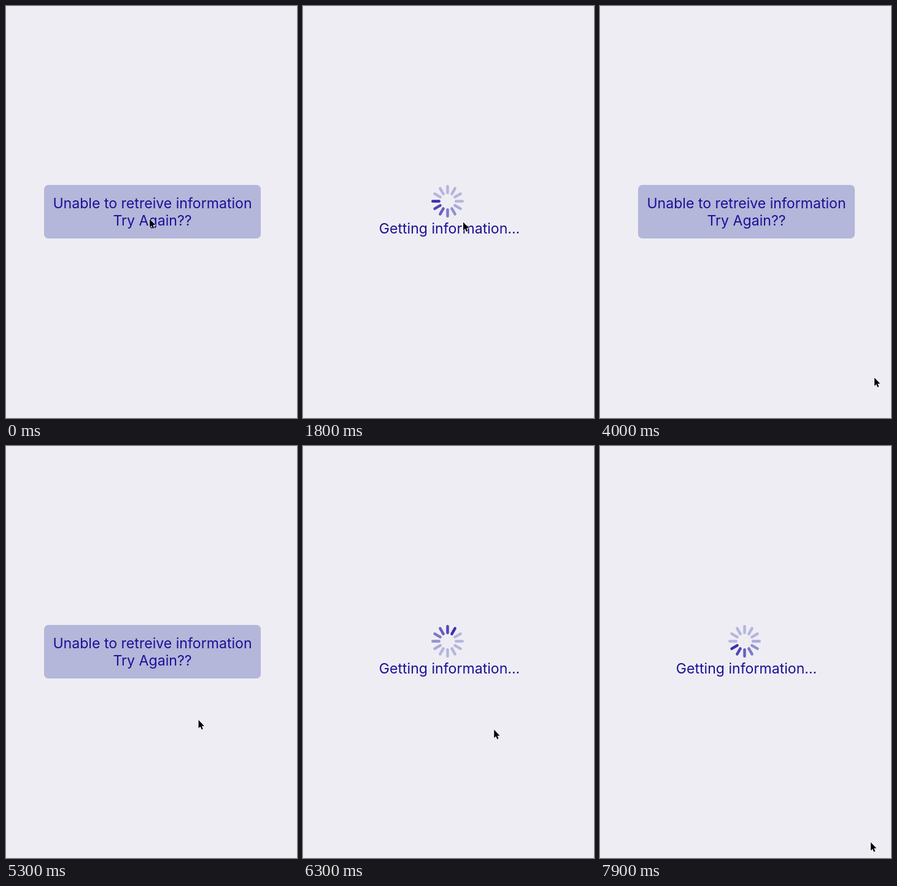
An HTML page that plays this animation: 474 px wide and 670 px high, repeating every 8 s.

```html
<!DOCTYPE html>
<html lang="en">
<head>
<meta charset="utf-8">
<title>Retry</title>
<style>
  html, body { margin: 0; width: 100%; height: 100%; overflow: hidden; background: #eeedf3; }
  svg { display: block; }
  text { font: 23.1px Inter, "Open Sans", sans-serif; fill: #1b1096; text-anchor: middle; }
  #spokes { stroke-width: 4.5; stroke-linecap: round; }
</style>
</head>
<body>
<svg width="474" height="670" viewBox="0 0 474 670">
  <g id="button">
    <rect x="62" y="291" width="353" height="87" rx="7" fill="#b4b6da"/>
    <text x="238.5" y="329">Unable to retreive information</text>
    <text x="238.5" y="357.3">Try Again??</text>
  </g>
  <g id="loader">
    <g id="spokes" transform="translate(235.5 317.5)"></g>
    <text x="238.5" y="370">Getting information...</text>
  </g>
  <path id="cursor" d="M1 1.5V15L4 12.1L6.1 17L8.3 16.1L6.2 11.3H10.4Z"
        stroke="#fff" stroke-width="1.2" paint-order="stroke"/>
</svg>
<script>
const LOOP = 8000, STEP = 100, PRESS_TIME = 250, SPOKES = 12;
const $ = id => document.getElementById(id);

// phase: spinner offset in spokes
const loads = [
  { press: 1050, end: 3900, phase: 0.1 },
  { press: 5850, end: 9000, phase: 9.6 },
];
const home = { x: 233, y: 345 };
const moves = [
  { from: 1500, to: 1800, x: 260, y: 350 },
  { from: 1800, to: 2400, x: 400, y: 560 },
  { from: 2800, to: 3100, x: 446, y: 603 },
  { from: 4900, to: 5600, x: 226, y: 341 },
  { from: 6000, to: 6700, x: 440, y: 643 },
];

const clamp = v => Math.min(1, Math.max(0, v));
const ease = k => k * k * (3 - 2 * k);

const spokes = Array.from({ length: SPOKES }, (_, i) => {
  const line = document.createElementNS("http://www.w3.org/2000/svg", "line");
  line.setAttribute("y1", -13.8);
  line.setAttribute("y2", -24.2);
  line.setAttribute("transform", `rotate(${i * 360 / SPOKES})`);
  return $("spokes").appendChild(line);
});

function cursorAt(t) {
  let { x, y } = home;
  for (const m of moves) {
    const k = ease(clamp((t - m.from) / (m.to - m.from)));
    x += (m.x - x) * k;
    y += (m.y - y) * k;
  }
  return [x, y];
}

function draw(t) {
  const load = loads.find(l => t >= l.press && t < l.end);
  const held = load ? t - load.press : 0;
  const loading = held >= PRESS_TIME;

  $("button").style.display = loading ? "none" : "";
  $("button").style.opacity = Math.max(0.2, 1 - held / 100);
  $("loader").style.display = loading ? "" : "none";

  if (loading) {
    const head = Math.floor(t * SPOKES / 1000 + load.phase);
    spokes.forEach((spoke, i) => {
      const lag = (head - i + SPOKES) % SPOKES;
      const dark = 100 * clamp(1 - lag / 5.5);
      spoke.style.stroke = `color-mix(in srgb, #3a2eae ${dark}%, #b4b6de)`;
    });
  }
  $("cursor").setAttribute("transform", `translate(${cursorAt(t)})`);
}

const start = performance.now();
function frame() {
  const t = (performance.now() - start) % LOOP;
  draw(Math.floor(t / STEP) * STEP);
  requestAnimationFrame(frame);
}
frame();
</script>
</body>
</html>
```
